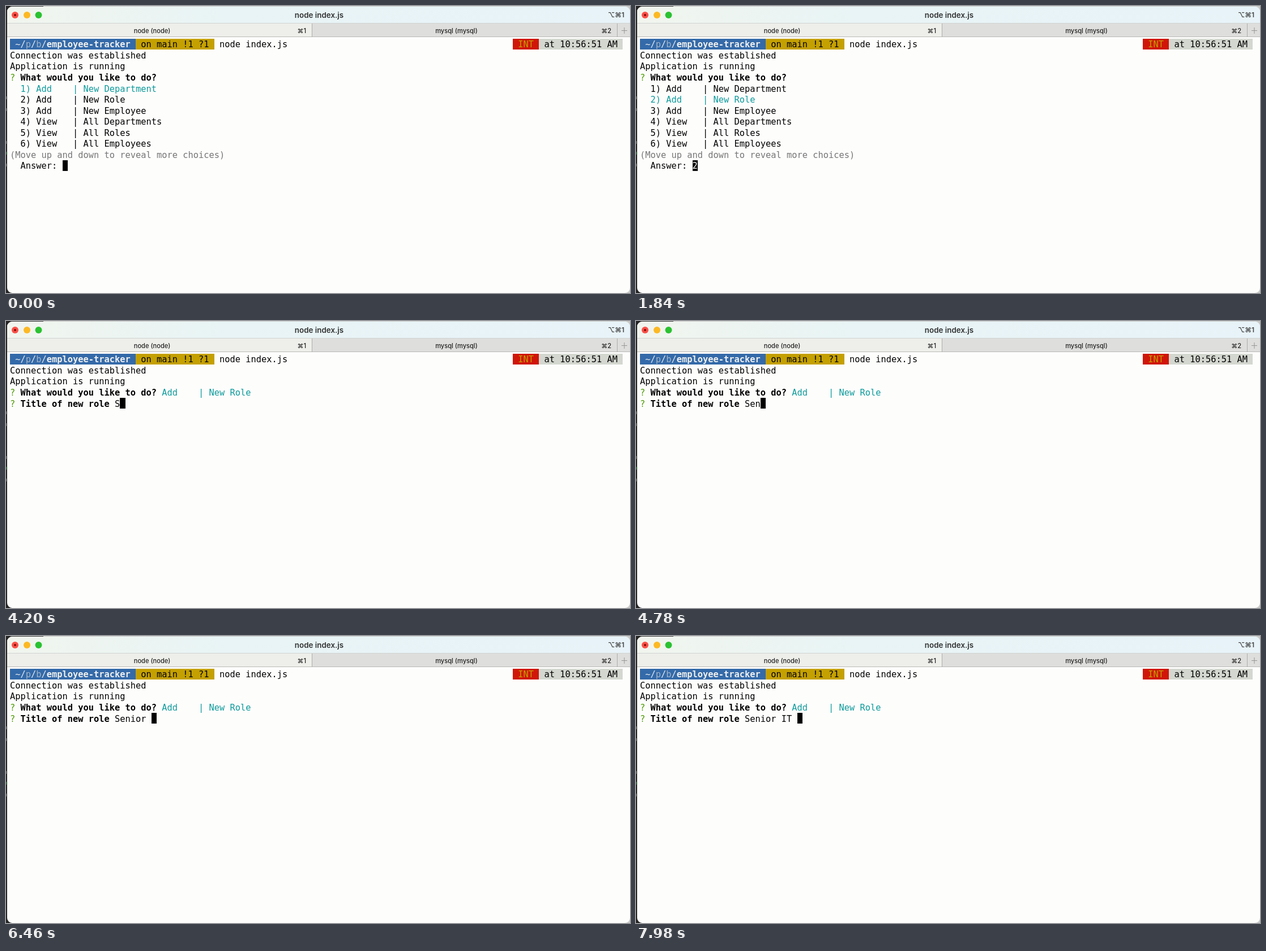
These frames come from a looping animation (1102 px wide and 508 px high, 8 s). An HTML page with a canvas:

```html
<!DOCTYPE html>
<html lang="en">
<head>
<meta charset="utf-8">
<style>
html, body { margin: 0; width: 100%; height: 100%; overflow: hidden; }
canvas { display: block; }
</style>
</head>
<body>
<canvas id="stage" width="1102" height="508"></canvas>
<script>
const ctx = document.getElementById('stage').getContext('2d');
const LOOP = 8000, LEFT = 7, TOP = 58, COL = 9.25, ROW = 19.55;
const MONO = '15.36px "DejaVu Sans Mono", monospace';
const UI = 'Inter, "DejaVu Sans", sans-serif';
const INK = '#000', TEAL = '#0d9a9b', GREEN = '#4e9a06', GOLD = '#c4a000';

const choices = [
  'Add    | New Department', 'Add    | New Role', 'Add    | New Employee',
  'View   | All Departments', 'View   | All Roles', 'View   | All Employees'
];
const SELECT_AT = 1300, ENTER_AT = 2300;
const answer = 'Senior IT ';
const keyTimes = [4060, 4500, 4740, 4940, 5160, 5480, 5760, 6860, 7140, 7460];

function rect(x, y, w, h, color) {
  ctx.fillStyle = color;
  ctx.fillRect(x, y, w, h);
}

function disc(x, y, r, color) {
  ctx.fillStyle = color;
  ctx.beginPath();
  ctx.arc(x, y, r, 0, Math.PI * 2);
  ctx.fill();
}

function label(text, x, y, font, color = '#222', align = 'center') {
  ctx.font = `${font} ${UI}`;
  ctx.textAlign = align;
  ctx.fillStyle = color;
  ctx.fillText(text, x, y);
}

// Fills whole terminal cells.
function cells(col, row, count, color) {
  const x = Math.round(LEFT + col * COL), y = Math.round(TOP + row * ROW);
  rect(x, y, Math.round(LEFT + (col + count) * COL) - x, 19, color);
}

// Prints text on the terminal's character grid.
function print(text, col, row, color = INK, bold = false) {
  ctx.font = (bold ? 'bold ' : '') + MONO;
  ctx.textAlign = 'left';
  ctx.fillStyle = color;
  const y = Math.round(TOP + 15.3 + row * ROW);
  [...text].forEach((ch, i) => ctx.fillText(ch, LEFT + (col + i) * COL, y));
}

function cursor(col, row, ch = '') {
  cells(col, row, 1, INK);
  print(ch, col, row, '#fff');
}

function question(text, row) {
  print('?', 0, row, GREEN);
  print(text, 2, row, INK, true);
}

function drawWindow() {
  rect(0, 0, 1102, 508, '#c9c9c7');
  rect(0, 0, 66, 1, '#343434');
  rect(0, 0, 10, 508, '#242424');
  for (const y of [160, 181, 239, 279]) rect(0, y, 1, 5, '#888');
  rect(0, 258, 1, 5, '#3c9a4c');

  ctx.save();
  ctx.beginPath();
  ctx.roundRect(2, 1, 1100, 507, 9);
  ctx.clip();
  rect(2, 1, 1100, 507, '#fdfdfc');
  const bar = ctx.createLinearGradient(2, 0, 1102, 0);
  bar.addColorStop(0, '#f1f5ee');
  bar.addColorStop(0.35, '#e8f4f5');
  bar.addColorStop(1, '#e7f3f8');
  rect(2, 1, 1100, 30, bar);
  rect(2, 31, 538, 24, '#eeeeea');
  rect(540, 31, 562, 24, '#dededc');
  rect(2, 30, 1100, 1, '#d0d3d2');
  rect(2, 54, 1100, 1, '#b9b9b7');
  rect(540, 31, 1, 24, '#adadab');
  rect(1079, 31, 1, 24, '#adadab');
  ctx.restore();

  disc(16, 16, 6, '#fb4f48');
  disc(16, 16, 2, '#7d0d08');
  disc(37, 16, 6, '#fdb924');
  disc(57.5, 16, 6, '#2ac231');
  label('node index.js', 553, 20.5, '600 13.4px', '#333');
  label('⌥⌘1', 1092, 20, '600 12px', '#444', 'right');
  label('node (node)', 258, 47.5, '500 11.1px');
  label('⌘1', 530, 47.5, '500 11.1px', '#222', 'right');
  label('mysql (mysql)', 795.5, 47.5, '500 11.1px');
  label('⌘2', 1069, 47.5, '500 11.1px', '#222', 'right');
  rect(1087, 43, 10, 1, '#969694');
  rect(1091.5, 38, 1, 11, '#969694');
}

function drawPrompt() {
  cells(0, 0, 24, '#346aa9');
  cells(24, 0, 15, GOLD);
  cells(96, 0, 5, '#d01608');
  cells(101, 0, 16, '#d3d7cf');
  print('~/', 1, 0, '#e4e8ec');
  print('p', 3, 0, '#a3b5c9');
  print('/', 4, 0, '#e4e8ec');
  print('b', 5, 0, '#a3b5c9');
  print('/', 6, 0, '#e4e8ec');
  print('employee-tracker', 7, 0, '#f0f0ee', true);
  print('on main !1 ?1', 25, 0);
  print('node index.js', 40, 0);
  print('INT', 97, 0, GOLD);
  print('at 10:56:51 AM', 102, 0);
  print('Connection was established', 0, 1);
  print('Application is running', 0, 2);
  question('What would you like to do?', 3);
}

function drawMenu(selected) {
  choices.forEach((text, i) =>
    print(`${i + 1}) ${text}`, 2, 4 + i, i === selected ? TEAL : INK));
  print('(Move up and down to reveal more choices)', 0, 10, '#767676');
  print('Answer:', 2, 11);
  cursor(10, 11, selected ? String(selected + 1) : '');
}

function drawTitleInput(t) {
  const typed = keyTimes.filter(at => t >= at).length;
  print(choices[1], 29, 3, TEAL);
  question('Title of new role', 4);
  print(answer.slice(0, typed), 20, 4);
  cursor(20 + typed, 4);
}

function frame() {
  const t = performance.now() % LOOP;
  drawWindow();
  drawPrompt();
  if (t < ENTER_AT) drawMenu(t < SELECT_AT ? 0 : 1);
  else drawTitleInput(t);
  requestAnimationFrame(frame);
}
frame();
</script>
</body>
</html>
```
